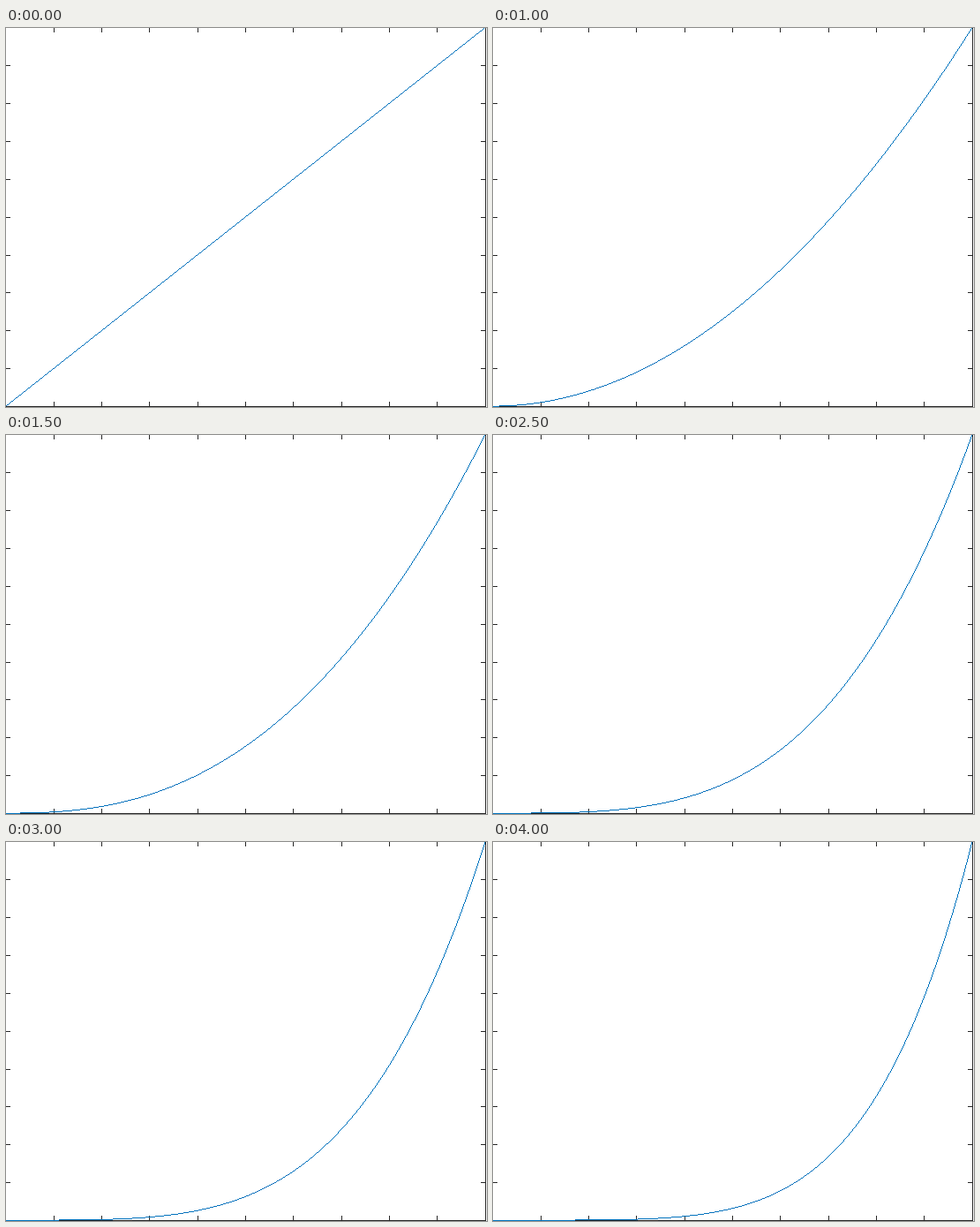
Write a matplotlib script that moves like this. It is 545x429 px and loops after 4500 ms.

```python
import numpy as np
import matplotlib.pyplot as plt
from matplotlib.animation import FuncAnimation
from matplotlib.collections import PolyCollection
from matplotlib.patches import Rectangle

W, H, DPI = 545, 429, 100
INK, BLUE = "#262626", "#0072BD"
RIGHT, BOTTOM = 543, 428        # pixel column and row of the axis lines
BASE, SPAN = 428.062, 428.57    # curve height: zero level and full rise
TICK = 5

fig = plt.figure(figsize=(W / DPI, H / DPI), dpi=DPI, facecolor="white")
ax = fig.add_axes([0, 0, 1, 1])
ax.set_xlim(0, W)
ax.set_ylim(H, 0)
ax.axis("off")


def bar(x, y, w, h):
    ax.add_patch(Rectangle((x, y), w, h, fc=INK, lw=0, antialiased=False))


def draw_axes():
    bar(0, BOTTOM, RIGHT + 1, 1)
    bar(RIGHT, 0, 1, H)
    for k in range(1, 10):
        x = round(-0.4 + 54.3 * k)
        y = round(BOTTOM - 42.86 * k)
        bar(x, 0, 1, TICK)
        bar(x, BOTTOM - TICK, 1, TICK)
        bar(0, y, TICK, 1)
        bar(RIGHT - TICK, y, TICK, 1)


def curve_cells(power):
    """Pixels of y = x**power: one per column where flat, one per row where steep."""
    def slope(u):
        return SPAN / RIGHT * power * u ** (power - 1)

    cols = np.arange(RIGHT)
    u = (cols + 0.5) / RIGHT
    rows = np.floor(BASE - SPAN * u ** power)
    flat = slope(u) <= 1
    cells = set(zip(cols[flat], rows[flat]))

    rows = np.arange(BOTTOM)
    u = ((BASE - rows - 0.5) / SPAN) ** (1 / power)
    cols = np.floor(u * RIGHT)
    steep = slope(u) > 1
    cells |= set(zip(cols[steep], rows[steep]))
    return np.array(sorted(cells), dtype=float)


draw_axes()
square = np.array([[0, 0], [1, 0], [1, 1], [0, 1]])
curve = PolyCollection([], facecolors=BLUE, edgecolors="none", linewidths=0,
                       antialiaseds=False, zorder=3)
ax.add_collection(curve, autolim=False)


def update(i):
    cells = curve_cells(1 + 0.5 * i)
    curve.set_verts(cells[:, None, :] + square)
    return [curve]


anim = FuncAnimation(fig, update, frames=9, init_func=lambda: update(0),
                     interval=500, repeat=True, repeat_delay=0)
plt.show()
```
